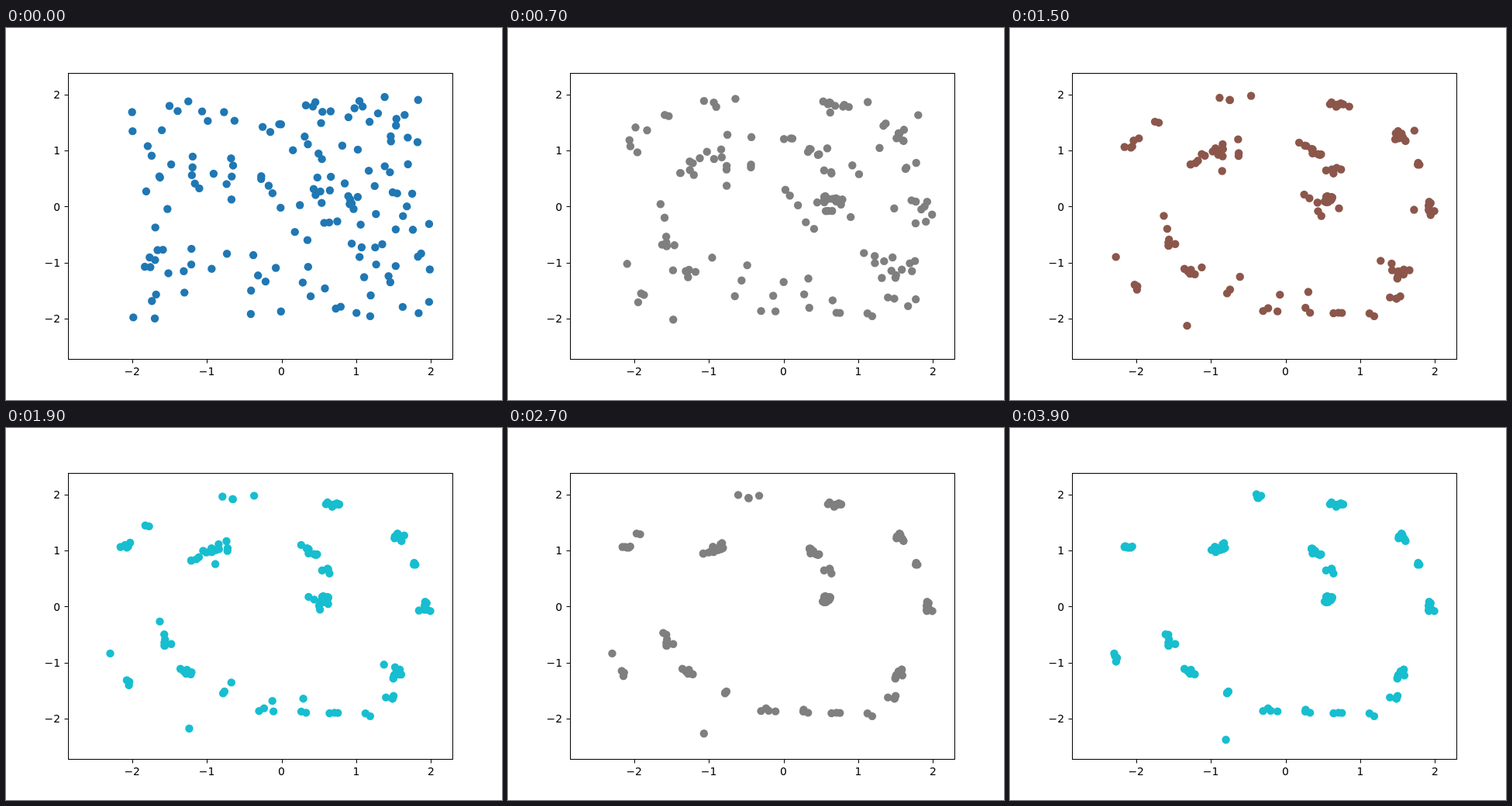
These frames come from a looping animation (640 by 480 pixels, 4 s). An HTML page:

```html
<!DOCTYPE html>
<html lang="en">
<head>
<meta charset="utf-8">
<title>Scatter drift</title>
<style>
  html, body { margin: 0; width: 100%; height: 100%; overflow: hidden; background: #fff; }
  svg { display: block; width: 640px; height: 480px; }
  text { font: 13.89px "DejaVu Sans", sans-serif; }
</style>
</head>
<body>
<svg viewBox="0 0 640 480">
  <g id="dots"></g>
  <g id="axes" stroke="#000" fill="none">
    <rect x="80.5" y="58.5" width="496" height="369"/>
  </g>
  <g id="labels"></g>
</svg>
<script>
const LOOP = 4000, STEP = 100, COUNT = 150;
const GAP_SPEED = 0.3, SLIDE_SPEED = 0.24;   // plot units per second
const MAX_GAP = 0.85;
const COLORS = ['#1f77b4', '#ff7f0e', '#2ca02c', '#d62728', '#9467bd',
                '#8c564b', '#e377c2', '#7f7f7f', '#bcbd22', '#17becf'];

// Gathering points on a spiral: angle in degrees, radius
const knots = [
  [10, 0.57], [50, 0.89], [67, 1.03], [131, 1.38], [201, 1.66], [223, 1.72],
  [243, 1.74], [264, 1.87], [278, 1.9], [290, 2.05], [302, 2.25], [313, 2.17],
  [322, 1.96], [360, 1.96], [382, 1.97], [397, 1.98], [429, 1.95], [449, 2],
  [459, 2], [514, 2.36], [547, 2.48], [560, 2.45], [619, 2.48]
];

const el = (name, attrs, parent) => {
  const node = document.createElementNS('http://www.w3.org/2000/svg', name);
  for (const key in attrs) node.setAttribute(key, attrs[key]);
  return parent.appendChild(node);
};
const [dotLayer, axes, labels] = ['dots', 'axes', 'labels'].map(id => document.getElementById(id));

const toX = v => 355.5 + 96.4 * v;
const toY = v => 230.4 - 72.4 * v;
const snap = v => Math.round(v) + 0.5;
const label = (v, x, y, anchor) => {
  el('text', { x, y, 'text-anchor': anchor }, labels).textContent = String(v).replace('-', '\u2212');
};
for (let v = -2; v <= 2; v++) {
  el('path', { d: `M${snap(toX(v))} 427.5v5M80.5 ${snap(toY(v))}h-5` }, axes);
  label(v, toX(v), 448, 'middle');
  label(v, 70, Math.round(toY(v) + 5.2), 'end');
}

let seed = 7;
const random = () => (seed = seed * 16807 % 2147483647) / 2147483647;

const radiusAt = angle => {
  const i = Math.max(1, knots.findIndex(k => k[0] >= angle));
  const [a, ra] = knots[i - 1], [b, rb] = knots[i];
  return ra + (rb - ra) * (angle - a) / (b - a);
};
const onSpiral = angle => {
  const r = radiusAt(angle), a = angle * Math.PI / 180;
  return { x: r * Math.cos(a), y: r * Math.sin(a), r, angle };
};
const samples = [];
for (let a = knots[0][0]; a <= knots[knots.length - 1][0]; a++) samples.push(onSpiral(a));

const closest = (items, distance) => items.reduce((a, b) => distance(b) < distance(a) ? b : a);

// Each dot starts anywhere in the square, off the spiral by at most MAX_GAP
const dots = [];
while (dots.length < COUNT) {
  const x = random() * 4 - 2, y = random() * 4 - 2;
  const foot = closest(samples, p => Math.hypot(p.x - x, p.y - y));
  const dx = x - foot.x, dy = y - foot.y, gap = Math.hypot(dx, dy);
  if (gap > MAX_GAP) continue;
  const knot = closest(knots, k => Math.abs(k[0] - foot.angle))[0];
  dots.push({
    dx, dy, gap, knot,
    turn: foot.angle - knot,
    slide: Math.abs(foot.angle - knot) * Math.PI / 180 * foot.r,
    gapRest: 0.05 * random(),
    slideRest: 0.1 * random(),
    node: el('circle', { r: 5.2 }, dotLayer)
  });
}

// Share of a distance still to go at steady speed, stopping a little short
const share = (distance, travelled, rest) => distance
  ? Math.max(distance - travelled, Math.min(distance, rest)) / distance
  : 0;

let shown = -1;
function draw(now) {
  const step = Math.floor(now % LOOP / STEP);
  if (step === shown) return;
  shown = step;
  const t = step * STEP / 1000;
  dotLayer.setAttribute('fill', COLORS[step % COLORS.length]);
  for (const d of dots) {
    const p = onSpiral(d.knot + d.turn * share(d.slide, SLIDE_SPEED * t, d.slideRest));
    const off = share(d.gap, GAP_SPEED * t, d.gapRest);
    d.node.setAttribute('cx', toX(p.x + d.dx * off));
    d.node.setAttribute('cy', toY(p.y + d.dy * off));
  }
}
const start = performance.now();
function tick() {
  draw(performance.now() - start);
  requestAnimationFrame(tick);
}
tick();
</script>
</body>
</html>
```
